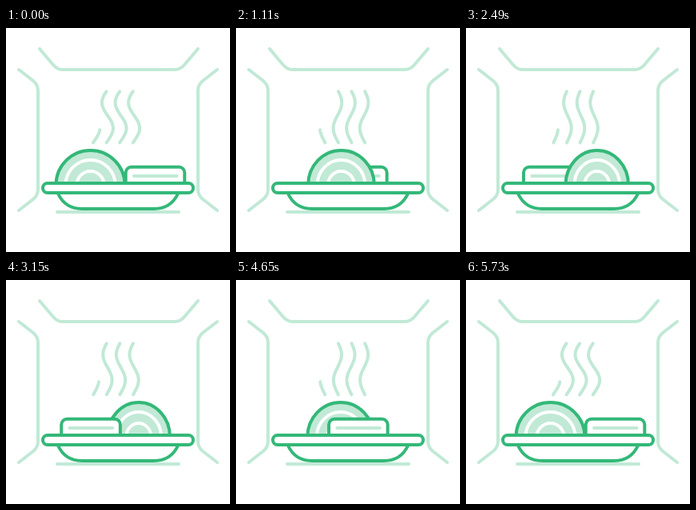
Write an HTML page that moves like this. It is 280 px wide and 280 px high and loops after 5760 ms.

```html
<!DOCTYPE html>
<html lang="en">
<head>
<meta charset="utf-8">
<title>Microwave</title>
<style>
html, body { margin: 0; width: 100%; height: 100%; overflow: hidden; background: #fff; }
svg { display: block; width: 100vw; height: 100vh; fill: none; stroke-width: 4; stroke-linecap: round; stroke-linejoin: round; }
.pale { stroke: #c1e9d6; }
.dark { stroke: #33b878; }
.white { fill: #fff; }
</style>
</head>
<body>
<svg viewBox="0 0 280 280">
  <g class="pale">
    <path d="M42 26L58 45Q64 52 70 52H211Q218 52 223 46L240 26"/>
    <path id="side" d="M16 52L34 66Q40 71 40 78V202Q40 209 34 214L16 228"/>
    <use href="#side" transform="translate(280 0) scale(-1 1)"/>
    <path d="M64 230H216"/>
    <path id="steam"/>
  </g>
  <g id="food">
    <g id="bread">
      <rect class="dark white" x="149.700" y="173.800" width="73.600" height="26" rx="7"/>
      <path class="pale" d="M160 185H213.500"/>
    </g>
    <g id="dome">
      <path id="shell" class="dark" fill="#c1e9d6"/>
      <path id="rings" stroke="#fff"/>
    </g>
  </g>
  <path class="dark white" d="M65 207Q74 226 95 226H185Q206 226 215 207"/>
  <rect class="dark white" x="46" y="194" width="188" height="12" rx="6"/>
</svg>
<script>
const LOOP = 5760, END = 5730, HALF = END / 2, TAU = 2 * Math.PI;
const $ = id => document.getElementById(id);
const food = $('food'), bread = $('bread'), dome = $('dome');
const lerp = (a, b, k) => a + (b - a) * k;

// One wave of steam around x, drawn from the fraction `from` of its height down.
function wisp(x, from, sway) {
  const points = [];
  for (let i = 0; i <= 32; i++) {
    const u = lerp(from, 1, i / 32);
    points.push([x + 7 * sway * Math.sin(TAU * u + 0.2), 79.3 + 64 * u]);
  }
  return 'M' + points.join('L');
}

function arch(cx, r, squeeze) {
  const rx = r * squeeze;
  return `M${cx - rx} 196A${rx} ${r} 0 0 1 ${cx + rx} 196`;
}

function draw(t) {
  const turn = 1 - Math.abs(1 - t / HALF);
  const sway = -Math.cos(2 * TAU * t / END);

  // The leftmost wisp is only a short curl.
  let steam = '';
  for (let i = 0; i < 4; i++) steam += wisp(110.3 + 16.6 * i, i ? 0 : 0.75, sway);
  $('steam').setAttribute('d', steam);

  const cx = lerp(105.5, 172.5, turn), squeeze = lerp(1, 0.9, turn);
  $('shell').setAttribute('d', arch(cx, 43, squeeze));
  $('rings').setAttribute('d', arch(cx, 31, squeeze) + arch(cx, 17, squeeze));
  bread.setAttribute('transform', `translate(${-89.4 * turn} 0)`);

  // The bread passes behind the dome on the way out and in front on the way back.
  const front = t > HALF ? bread : dome;
  if (food.lastElementChild !== front) food.append(front);
}

function tick() {
  draw(Math.min(performance.now() % LOOP, END));
  requestAnimationFrame(tick);
}
tick();
</script>
</body>
</html>
```
